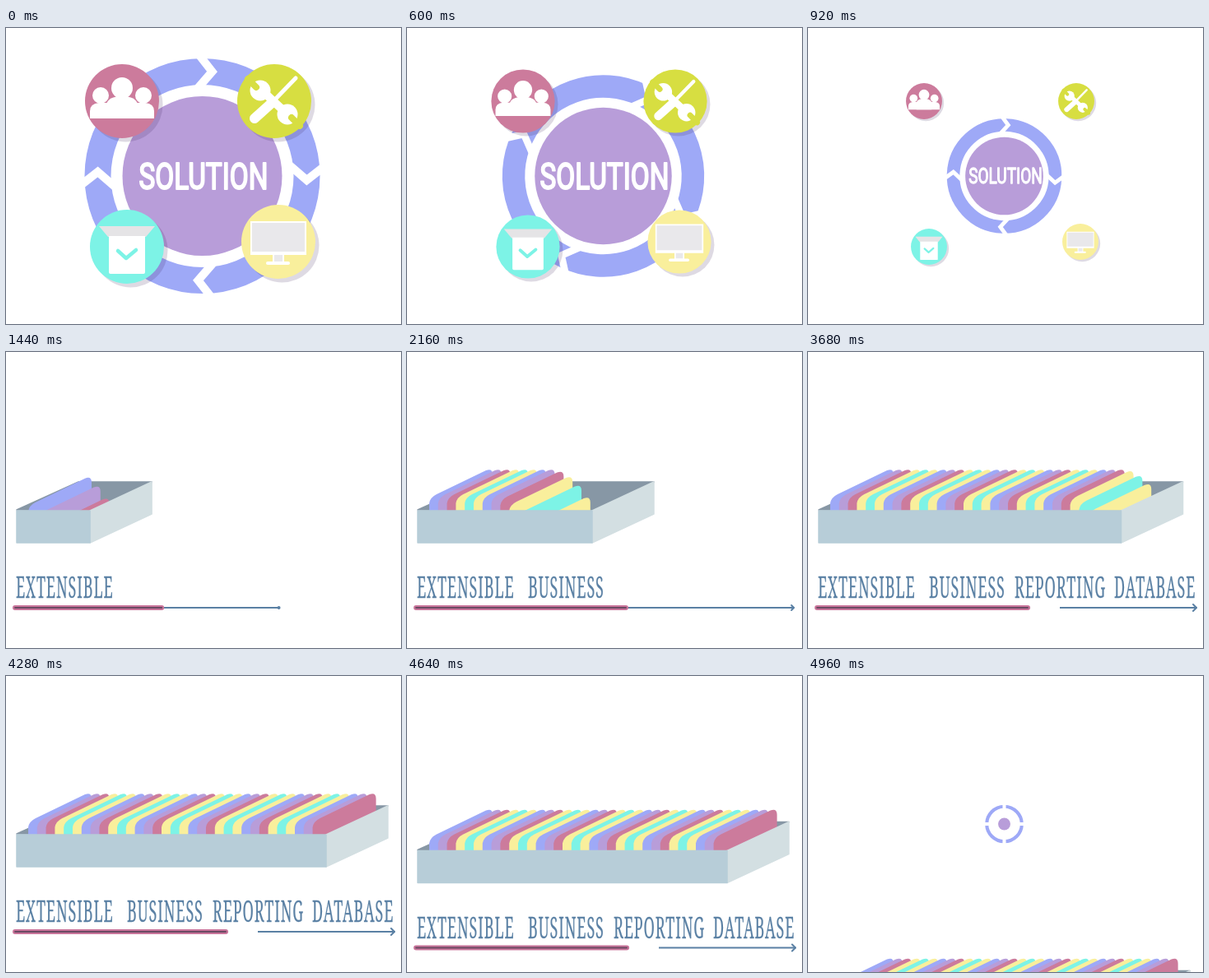
An HTML page with a canvas that plays this animation: 480 px wide and 360 px high, repeating every 5000 ms.

```html
<!DOCTYPE html>
<html lang="en">
<head>
<meta charset="utf-8">
<title>Solution</title>
<style>
  html, body { margin: 0; width: 100%; height: 100%; overflow: hidden; background: #fff; }
  canvas { display: block; }
</style>
</head>
<body>
<canvas id="stage" width="480" height="360"></canvas>
<script>
const ctx = document.getElementById('stage').getContext('2d');
const LOOP = 5000;
const BLUE = '#9ea9f7', PURPLE = '#b89dd9', PINK = '#cc7b9c', YELLOW = '#f9ef9c',
      AQUA = '#7df3e6', LIME = '#d7de41', INK = '#5a80a4', SHADE = '#e5e4e6';
const FOLDERS = [BLUE, PURPLE, PINK, YELLOW, AQUA, YELLOW];
const WORDS = [['EXTENSIBLE', 12, 1110], ['BUSINESS', 147, 1740],
               ['REPORTING', 251, 2360], ['DATABASE', 372, 3050]];

const clamp = v => Math.max(0, Math.min(1, v));
const span = (t, from, length) => clamp((t - from) / length);

function at(x, y, scale, angle, draw) {
  ctx.save();
  ctx.translate(x, y);
  ctx.rotate(angle);
  ctx.scale(scale, scale);
  draw();
  ctx.restore();
}

function disc(x, y, r, color) {
  ctx.fillStyle = color;
  ctx.beginPath();
  ctx.arc(x, y, r, 0, 2 * Math.PI);
  ctx.fill();
}

function shape(color, d) {
  ctx.fillStyle = color;
  ctx.fill(new Path2D(d));
}

function line(color, width, d, cap = 'round') {
  ctx.strokeStyle = color;
  ctx.lineWidth = width;
  ctx.lineCap = cap;
  ctx.lineJoin = cap === 'round' ? 'round' : 'miter';
  ctx.stroke(new Path2D(d));
}

// Filled panel with slightly rounded corners
function panel(color, d) {
  shape(color, d);
  line(color, 1.5, d);
}

// Text in a condensed cut
function label(text, x, y, font, color, condense, weight, spacing) {
  ctx.save();
  ctx.translate(x, y);
  ctx.scale(condense, 1);
  ctx.font = font;
  ctx.letterSpacing = spacing;
  ctx.fillStyle = ctx.strokeStyle = color;
  ctx.lineWidth = weight;
  ctx.lineJoin = 'round';
  ctx.fillText(text, 0, 0);
  ctx.strokeText(text, 0, 0);
  ctx.restore();
}

function people() {
  for (const x of [-26, 26]) disc(x, -7, 10, '#fff');
  shape('#fff', 'M-39 21V12Q-39 3 -28 2H28Q39 3 39 12V21Z');
  shape('#fff', 'M-19 21V4Q-17 -6 0 -6Q17 -6 19 4V21Z');
  disc(0, -16, 13, '#fff');
}

function tools() {
  line('#fff', 10, 'M-15 -13L16 16');
  for (const [x, y, s] of [[-17, -13, -1], [16, 16, 1]]) {
    disc(x, y, 12.5, '#fff');
    line(LIME, 8, `M${x + 5 * s} ${y + 4 * s}l${10 * s} ${10 * s}`);
  }
  line('#fff', 12, 'M-24 21L-4 3');
  line('#fff', 5, 'M-4 3L26 -28');
}

function monitor() {
  shape('#fff', 'M-34 -25H34V16H-34ZM-7 15H7V25H-7Z');
  shape('#e9e8eb', 'M-32 -23H32V12H-32ZM-5 16H5V24H-5Z');
  line('#fff', 4, 'M-13 26H12');
}

function parcel() {
  shape(SHADE, 'M-34 -25H34L23 -12H-23Z');
  shape('#fff', 'M-22 -13H22V31Q22 33 20 33H-20Q-22 33 -22 31Z');
  line(AQUA, 4.5, 'M-11 5L-1 14L11 4');
}

const ICONS = [[141, 89, PINK, people], [326, 89, LIME, tools],
               [331, 260, YELLOW, monitor], [147, 266, AQUA, parcel]];

// band: ring thickness, bend: how far the gaps fold into arrows (0..1)
function wheel({ ring, core, text = 0, icons = 0, angle = 0, band = 32, bend = 1 }) {
  at(238.5, 180, ring, angle, () => {
    ctx.strokeStyle = BLUE;
    ctx.lineWidth = band;
    ctx.beginPath();
    ctx.arc(0, 0, 143 - band / 2, 0, 2 * Math.PI);
    ctx.stroke();
    for (let i = 0; i < 4; i++) {
      const x = bend * (i ? -13 : -6);
      line('#fff', 10 + 15 * (1 - bend), `M${x} -150l${18 * bend} 23l${-19 * bend} 22`, 'butt');
      ctx.rotate(Math.PI / 2);
    }
  });
  at(238.5, 180, core, 0, () => disc(0, 0, 97, PURPLE));
  at(240, 180, text, 0, () => {
    ctx.textAlign = 'center';
    label('SOLUTION', 0, 16, '45px Roboto, sans-serif', '#fff', 0.74, 2.2, '0px');
    ctx.textAlign = 'left';
  });
  for (const [x, y, color, draw] of ICONS) {
    at(x, y, icons, 0, () => {
      disc(4.5, 4.5, 45, 'rgba(50, 30, 80, 0.16)');
      disc(0, 0, 45, color);
      draw();
    });
  }
}

function drawer(t) {
  const width = 377 * Math.sin(span(t, 956, 3150) * Math.PI / 2);
  const right = 12 + width, back = right + 76;
  const settled = 12.6 * (t - 1440) / 1000 - 2.2;

  ctx.save();
  const open = Math.sin(span(t, 956, 260) * Math.PI / 2);
  ctx.translate(12, 233);
  ctx.scale(open, open);
  ctx.translate(-12, -233);
  panel('#8797a5', `M13 192L88 158H${back - 1}L${right} 192Z`);
  for (let i = 0; i < 33; i++) {
    const sink = 2 * Math.max(0, i - settled) ** 2;
    if (sink > 49) break;
    at(27 + 10.8 * i, 0, 1, 0, () => shape(FOLDERS[i % 6],
      `M0 196V${184 + sink}Q1 ${177 + sink} 9 ${173 + sink}L69 ${144 + sink}` +
      `Q77 ${141 + sink} 77 ${149 + sink}V196Z`));
  }
  panel('#d3dfe2', `M${right} 193L${back - 1} 158V197L${right} 232Z`);
  panel('#b7cdd8', `M13 193H${right}V232H13Z`);
  ctx.restore();
}

function caption(t) {
  for (const [word, x, start] of WORDS) {
    const typed = Math.floor((t - start) / 30);
    if (typed > 0) {
      label(word.slice(0, typed), x, 299, '36px "Noto Serif", serif', INK, 0.5, 0.3, '1.8px');
    }
  }
}

function timeline(t) {
  const p = 1 - (1 - span(t, 980, 1404)) ** 3;
  const tip = 10 + 462 * p, bar = 11 + 256 * p;
  line(INK, 2, `M10 311H${tip}`);
  if (t > 2500) line('#fff', 4, 'M270 311H306', 'butt');
  line('#c9749a', 6, `M11 311H${bar}`);
  line('#6a4962', 2, `M11 311H${bar}`);
  const head = 4 * span(t, 1900, 350);
  if (head) line(INK, 2, `M${tip - head} ${311 - head}L${tip} 311L${tip - head} ${311 + head}`);
  else disc(tip, 311, 2, INK);
}

function render(t) {
  ctx.fillStyle = '#fff';
  ctx.fillRect(0, 0, 480, 360);
  if (t < 1150) {
    const p = (t / 1150) ** 3, size = 1 - p;
    wheel({ ring: size, core: size, text: Math.min(1, size * 1.17), icons: size, angle: p * Math.PI });
  }
  if (t > 980) {
    ctx.save();
    ctx.translate(0, 200.5 * Math.max(0, (t - 4235) / 725) ** 4);
    drawer(t);
    caption(t);
    timeline(t);
    ctx.restore();
  }
  if (t > 4920) {
    wheel({ ring: (t - 4920) / 245, core: Math.max(0, (t - 4940) / 260), band: 25, bend: 0 });
  }
}

let began;
function tick(now) {
  began ??= now;
  render((now - began) % LOOP);
  requestAnimationFrame(tick);
}
requestAnimationFrame(tick);
</script>
</body>
</html>
```
